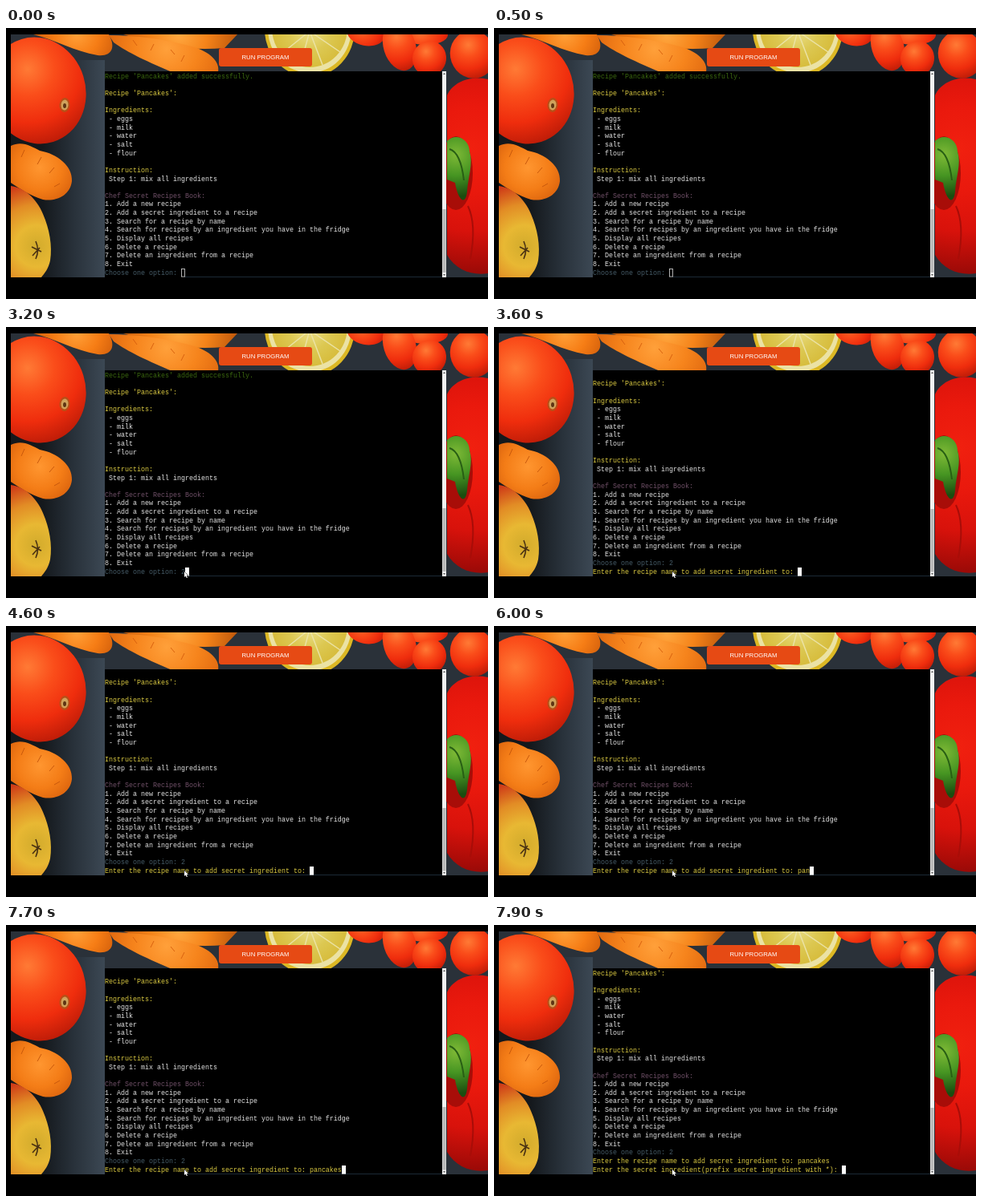
An HTML page with a canvas that plays this animation: 600 px wide and 338 px high, repeating every 8000 ms.

```html
<!DOCTYPE html>
<html lang="en">
<head>
<meta charset="utf-8">
<title>Recipe terminal</title>
<style>
html, body { margin: 0; width: 100%; height: 100%; overflow: hidden; background: #000; }
canvas { display: block; }
</style>
</head>
<body>
<canvas id="stage" width="600" height="338"></canvas>
<script>
const canvas = document.getElementById('stage');
const ctx = canvas.getContext('2d');
const LOOP = 8000;
const CELL = 5, ROW = 10.65, LEFT = 123, TOP = 55, ROWS = 24;
const WHITE = '#e4e4e4', YELLOW = '#dccb42', GREEN = '#3b680f', PURPLE = '#705068', SLATE = '#465c68';

const backlog = [
  ["Recipe 'Pancakes' added successfully.", GREEN],
  [''],
  ["Recipe 'Pancakes':", YELLOW],
  [''],
  ['Ingredients:', YELLOW],
  [' - eggs'], [' - milk'], [' - water'], [' - salt'], [' - flour'],
  [''],
  ['Instruction:', YELLOW],
  [' Step 1: mix all ingredients'],
  [''],
  ['Chef Secret Recipes Book:', PURPLE],
  ['1. Add a new recipe'],
  ['2. Add a secret ingredient to a recipe'],
  ['3. Search for a recipe by name'],
  ['4. Search for recipes by an ingredient you have in the fridge'],
  ['5. Display all recipes'],
  ['6. Delete a recipe'],
  ['7. Delete an ingredient from a recipe'],
  ['8. Exit']
];

// Each prompt: when it appears, its answer, and when each key lands.
const prompts = [
  { at: 0, text: 'Choose one option: ', color: SLATE, answer: '2', keys: [3000] },
  { at: 3600, text: 'Enter the recipe name to add secret ingredient to: ', color: YELLOW,
    answer: 'pancakes', keys: [5300, 5700, 5900, 6300, 6500, 6800, 7000, 7300] },
  { at: 7800, text: 'Enter the secret ingredient(prefix secret ingredient with *): ', color: YELLOW,
    answer: '', keys: [] }
];
const FOCUS = 2100;
const mousePath = [[1000, 232, 280], [1400, 208, 302], [1800, 222, 305]];

function layer(draw) {
  const c = document.createElement('canvas');
  c.width = 600;
  c.height = 338;
  draw(c.getContext('2d'));
  return c;
}

function addStops(fill, stops) {
  stops.forEach((s, i) => fill.addColorStop(i / (stops.length - 1), s));
  return fill;
}

function shade(g, x, y, r, stops) {
  return addStops(g.createRadialGradient(x, y, 0, x, y, r), stops);
}

function oval(g, x, y, rx, ry, turn, fill) {
  g.fillStyle = fill;
  g.beginPath();
  g.ellipse(x, y, rx, ry, turn, 0, Math.PI * 2);
  g.fill();
}

function path(g, d, fill) {
  g.fillStyle = fill;
  g.fill(new Path2D(d));
}

function stroke(g, d, color, width) {
  g.strokeStyle = color;
  g.lineWidth = width;
  g.stroke(new Path2D(d));
}

function tomato(g, x, y, rx, ry, turn) {
  oval(g, x, y, rx, ry, turn,
    shade(g, x - rx * 0.2, y - ry * 0.4, Math.max(rx, ry) * 1.5, ['#ff7a35', '#fa4d1a', '#ef2d0d', '#b81a07']));
}

function drawTable(g) {
  g.fillStyle = '#2a3139';
  g.fillRect(6, 8, 594, 303);
  g.fillStyle = addStops(g.createLinearGradient(45, 0, 123, 0), ['#14181c', '#28313a', '#3c4854']);
  g.fillRect(6, 40, 117, 271);
}

function drawTopRow(g) {
  path(g, 'M34 8 C62 15 85 29 114 34 C132 36 137 24 128 8Z',
    shade(g, 88, 8, 55, ['#ffa038', '#f67d15', '#cf5c0a']));
  path(g, 'M146 8 C185 21 225 29 272 25 L288 8Z',
    shade(g, 215, 8, 70, ['#ffa840', '#f5841a', '#c45c0c']));
  path(g, 'M128 9 C160 9 200 14 235 24 C258 32 266 44 264 55 L207 55 C180 44 150 30 134 18Z',
    shade(g, 200, 26, 80, ['#ffa03a', '#f6841c', '#dd640d']));
  stroke(g, 'M158 15 l5 7 M184 20 l-4 8 M205 27 l5 6 M222 34 l-4 8', '#d9620f', 1);

  oval(g, 378, 2, 56, 59, 0, '#dcb824');
  oval(g, 378, 1, 52, 55, 0, '#ebe2a4');
  oval(g, 378, 0, 47, 49, 0, shade(g, 378, 4, 50, ['#ebdf88', '#dcc852', '#d6ba38']));
  stroke(g, 'M378 4 L343 32 M378 4 L366 48 M378 4 L394 46 M378 4 L416 30', '#ebe2a4', 1.5);

  tomato(g, 448, 6, 24, 16, 0.2);
  tomato(g, 522, 9, 28, 12, 0);
  tomato(g, 490, 23, 20, 31, -0.3);
  tomato(g, 527, 38, 21, 22, 0.3);
  tomato(g, 581, 33, 28, 30, -0.35);
}

function drawLeftSide(g) {
  tomato(g, 39, 78, 60, 67, -0.3);
  oval(g, 73, 96, 6.5, 9, 0.1, '#b84f17');
  oval(g, 73, 96, 4.5, 6.5, 0.1, '#cfa25c');
  oval(g, 73, 97, 2, 3, 0, '#5f3514');

  path(g, 'M6 147 C20 140 32 148 42 153 C64 157 83 172 82 191 C80 209 62 217 46 214 C30 209 18 201 6 193Z',
    shade(g, 42, 174, 56, ['#ff9630', '#f47d17', '#d25a0a']));
  stroke(g, 'M23 152 l-4 9 M44 161 l-5 9 M60 174 l-6 7 M67 194 l-7 4', '#c9590c', 1);

  path(g, 'M6 197 C22 199 38 212 46 232 C54 250 58 272 55 290 C53 300 48 306 44 311 H6Z',
    shade(g, 38, 272, 78, ['#d2ab2c', '#e8b833', '#e28c25', '#cf3d18']));
  stroke(g, 'M37 266 Q42 277 37 288 M32 273 L44 279 M33 284 L42 274', '#4a3213', 1.6);
}

function drawPepper(g) {
  path(g, 'M549 84 C556 68 577 59 600 64 V306 C580 309 560 302 549 283Z',
    shade(g, 580, 150, 155, ['#f0200f', '#ea190d', '#d8120b', '#9c0a07']));
  oval(g, 560, 181, 21, 46, 0, '#a80d08');
  stroke(g, 'M575 222 Q586 245 578 288', '#a80d08', 2);
  path(g, 'M549 141 C560 130 577 139 577 154 C582 169 575 186 574 204 C572 222 563 216 559 193 L549 189Z',
    shade(g, 560, 158, 52, ['#7fb936', '#469522', '#1b4d10']));
  stroke(g, 'M552 151 Q566 155 570 190', '#285f14', 2);
}

function drawChrome(g) {
  g.fillStyle = '#000';
  g.fillRect(123, 54, 425, 257);
  g.fillStyle = '#1c2a36';
  g.fillRect(222, 310, 321, 1);
  g.fillStyle = '#e64a14';
  g.beginPath();
  g.roundRect(265, 25, 116, 23, 3);
  g.fill();
  g.fillStyle = '#fff';
  g.font = '7.75px "Liberation Sans", Arial, sans-serif';
  g.textAlign = 'center';
  g.fillText('RUN PROGRAM', 323, 39);
}

const scene = layer(g => {
  g.fillStyle = '#000';
  g.fillRect(0, 0, 600, 338);
  g.save();
  g.beginPath();
  g.rect(6, 8, 594, 303);
  g.clip();
  drawTable(g);
  drawTopRow(g);
  drawLeftSide(g);
  drawPepper(g);
  g.restore();
  drawChrome(g);
});

function drawScrollbar(shift) {
  ctx.fillStyle = '#f1f1f1';
  ctx.fillRect(543, 54, 5, 257);
  ctx.fillStyle = '#b8b8b8';
  ctx.fillRect(543.5, 226 + shift, 4, 79 - shift * 0.5);
  path(ctx, 'M544 58 L545.5 56 L547 58Z M544 307 L545.5 309 L547 307Z', '#555');
}

function drawCursor(col, focused) {
  const x = LEFT + col * CELL, y = TOP + 23 * ROW;
  if (focused) {
    ctx.fillStyle = '#fff';
    ctx.fillRect(x, y, CELL, ROW);
  } else {
    ctx.strokeStyle = '#c4c4c4';
    ctx.lineWidth = 0.9;
    ctx.strokeRect(x + 0.5, y + 0.5, CELL - 1, ROW - 1);
  }
}

function drawTerminal(t) {
  const shown = prompts.filter(p => t >= p.at).map(p => ({
    text: p.text + p.answer.slice(0, p.keys.filter(k => t >= k).length),
    color: p.color
  }));
  const lines = backlog.concat(shown.map(p => [p.text, p.color]));
  ctx.font = '8.333px "Liberation Mono", "Courier New", monospace';
  lines.slice(-ROWS).forEach(([text, color = WHITE], i) => {
    ctx.fillStyle = color;
    ctx.fillText(text, LEFT, TOP + i * ROW + 7.7);
  });
  drawCursor(shown[shown.length - 1].text.length, t >= FOCUS);
  drawScrollbar(shown.length - 1);
}

function mouseAt(t) {
  if (t < mousePath[0][0]) return null;
  for (let i = 1; i < mousePath.length; i++) {
    const [t0, x0, y0] = mousePath[i - 1], [t1, x1, y1] = mousePath[i];
    if (t < t1) {
      const k = (t - t0) / (t1 - t0), e = k * k * (3 - 2 * k);
      return [x0 + (x1 - x0) * e, y0 + (y1 - y0) * e];
    }
  }
  return mousePath[mousePath.length - 1].slice(1);
}

function drawMouse(t) {
  const pos = mouseAt(t);
  if (!pos) return;
  ctx.save();
  ctx.translate(...pos);
  const arrow = 'M0 0 V7 L1.6 5.6 L2.8 8 L4 7.4 L2.9 5 H5Z';
  stroke(ctx, arrow, '#000', 1);
  path(ctx, arrow, '#fff');
  ctx.restore();
}

function frame(now) {
  const t = Math.floor((now % LOOP) / 100) * 100;
  ctx.drawImage(scene, 0, 0);
  drawTerminal(t);
  drawMouse(t);
  requestAnimationFrame(frame);
}
requestAnimationFrame(frame);
</script>
</body>
</html>
```
